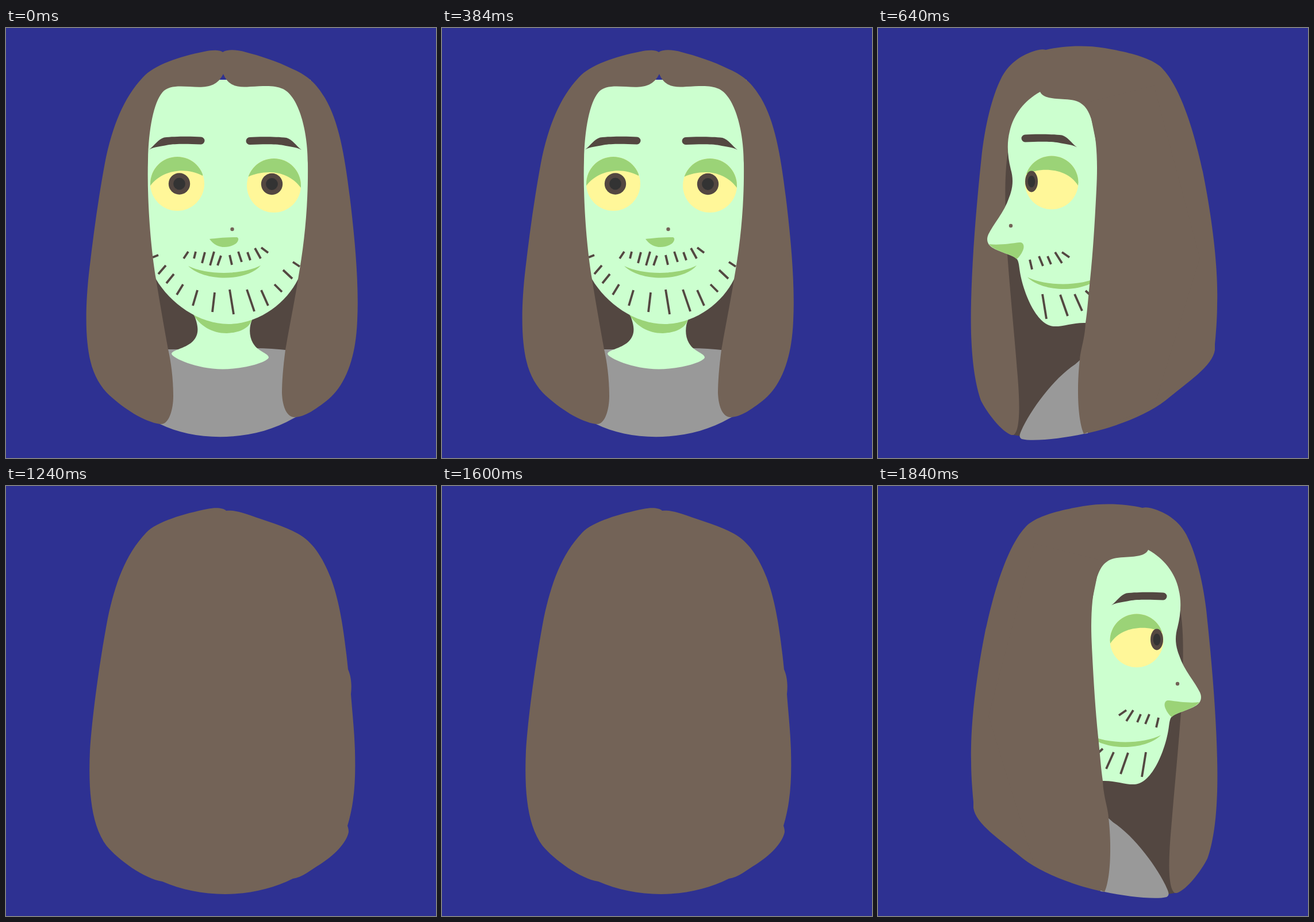
Recreate the animation shown at these times as an HTML page. Size 748 by 748 pixels, loop 2440 ms.

```html
<!DOCTYPE html>
<html lang="en">
<head>
<meta charset="utf-8">
<title>Turning head</title>
<style>
  html, body { margin: 0; width: 100%; height: 100%; overflow: hidden; background: #2e3192; }
  svg { display: block; width: 100vw; height: 100vh; }
  .pose { opacity: 0; }
  .hair { fill: #736357; }
  .dark { fill: #534741; }
  .skin { fill: #ccffcf; }
  .green { fill: #9bd377; }
  .shirt { fill: #999; }
  .eye { fill: #fff799; }
  .pupil { fill: #333; }
  .stubble { fill: none; stroke: #534741; stroke-width: 3.8; }
</style>
</head>
<body>
<svg viewBox="0 0 748 748">
  <defs>
    <path id="brow" class="dark" d="M514 212C505 205 498 194 488 191C470 189 440 189 424 190A6.5 6.5 0 0 0 424 203C450 202 470 202 482 204C495 207 505 207 514 212Z"/>
    <path id="mouth" class="green" d="M317 414C350 430 410 430 443 413C420 441 345 442 317 414Z"/>
    <clipPath id="eyeL"><circle cx="298" cy="271" r="47"/></clipPath>
    <clipPath id="eyeR"><circle cx="466" cy="274" r="47"/></clipPath>
    <clipPath id="eyeS"><circle cx="302" cy="269" r="46.5"/></clipPath>

    <g id="side">
      <path class="hair" d="M292 38C283 36 275 39 266 42C240 52 224 68 214 88C198 120 186 170 180 225C170 320 164 400 162 475C160 555 166 610 179 648C190 670 215 702 232 708L358 706C405 697 465 675 500 648C540 615 582 588 586 560C586 555 586 553 586 550C588 530 590 505 590 480C592 420 582 335 565 250C550 180 525 97 490 66C470 50 430 41 395 35C360 29 320 31 292 38Z"/>
      <path class="dark" d="M226 215C219 260 221 320 225 393C229 450 236 520 242 595C247 650 248 700 236 708L248 710L360 590L375 500L245 300Z"/>
      <path class="shirt" d="M365 705L358 706C320 714 270 720 250 715C245 712 246 708 249 701C265 665 305 610 343 585L360 570Z"/>
      <path class="skin" d="M282 111C287 122 305 123 325 124C350 125 362 132 371 158L390 250L375 513H361C340 512 322 520 305 519C275 516 253 460 247 425C245 412 245 402 238 399C228 393 203 387 195 379C189 373 189 366 192 359C200 342 220 320 228 295C236 275 235 260 231 246C225 222 224 200 229 180C236 150 254 127 282 111Z"/>
      <path class="green" d="M193 376C210 378 230 375 246 373C254 372 255 381 252 387C249 394 245 399 241 402C233 393 203 389 193 376Z"/>
      <circle class="hair" cx="231" cy="344" r="3.2"/>
      <use href="#brow" x="-168" y="-4.5"/>
      <g clip-path="url(#eyeS)">
        <circle class="eye" cx="302" cy="269" r="47"/>
        <path class="green" d="M250 258L258 254C285 241 330 244 348 274L360 215H250Z"/>
      </g>
      <ellipse class="dark" cx="267" cy="267" rx="11" ry="18.5"/>
      <ellipse class="pupil" cx="267" cy="267" rx="6.3" ry="10.3"/>
      <use href="#mouth" x="-57" y="19.5"/>
      <path class="stubble" d="M264 403L268 420M280 397L287 414M295 397L301 411M308 390L320 409M320 390L333 399M286 463L293 506M317 464L330 501M342 463L355 492M361 457L372 467"/>
      <path class="hair" d="M360 130C363 136 367 145 371 158C382 195 382 240 380 280C377 340 374 390 369 437C366 465 364 495 361 513C360 540 352 560 351 577C347 610 345 675 358 706L480 660L560 400L480 100Z"/>
    </g>
  </defs>

  <rect width="748" height="748" fill="#2e3192"/>

  <g class="pose">
    <path class="dark" d="M255 430H515L490 565H275Z"/>
    <path class="shirt" d="M268 559H312L380 570L434 557Q460 557 495 561L510 674L500 679C430 720 330 720 268 689L260 680Z"/>
    <path class="skin" d="M326 496C336 520 336 533 325 545C312 558 288 560 288 567C290 574 330 593 377 593.500C420 593 456 580 457 573C457 567 440 562 433 553C422 540 422 520 429 505Z"/>
    <path class="green" d="M325 497C337 518 358 531 384 531C405 530 424 523 428 506Z"/>
    <path class="skin" d="M240 90H530V390L508 437C488 478 440 515 387 515C335 515 285 478 261 437L240 400Z"/>
    <g clip-path="url(#eyeL)">
      <circle class="eye" cx="298" cy="271" r="48"/>
      <path class="green" d="M250 276C270 247 312 241 342 257L350 220H245Z"/>
    </g>
    <g clip-path="url(#eyeR)">
      <circle class="eye" cx="466" cy="274" r="48"/>
      <path class="green" d="M415 262L421 259C450 246 490 247 513 278L520 220H415Z"/>
    </g>
    <circle class="dark" cx="301.500" cy="271" r="18.700"/>
    <circle class="pupil" cx="301.500" cy="271" r="10.400"/>
    <circle class="dark" cx="462.500" cy="271.500" r="18.700"/>
    <circle class="pupil" cx="462.500" cy="271.500" r="10.400"/>
    <circle class="hair" cx="393.500" cy="350" r="3.200"/>
    <path class="green" d="M354 367C365 366 380 364 402 364C406 366 404 371 400 375C385 385 365 383 354 367Z"/>
    <use href="#mouth"/>
    <path class="stubble" d="M309 401L317 389M327 401L330 389M341 409L346 390M355 413L362 389M368 413L374 396M393 412L389 395M410 407L404 389M425 404L420 390M443 401L433 383M456 391L444 382"/>
    <path class="stubble" d="M255 399L265 395M265 428L278 413M279 444L292 428M297 464L308 446M325 483L333 456M359 494L363 460M396 498L389 455M432 493L419 455M456 483L444 456M480 459L467 446M498 436L482 421M511 415L499 407"/>
    <path class="hair" d="M377 42C372 38 358 38 345 41C300 50 258 64 238 86C205 121 185 170 172 235C160 300 152 360 145 420C138 480 137 540 147 580C153 605 165 625 180 639C205 662 240 685 268 689C283 691 291 665 291 640C291 610 287 580 282 559C275 520 267 475 261 437C252 385 245 300 247 230C248 175 257 130 272 112C282 100 300 101 320 102C345 104 366 104 378 80C387 102 405 104 425 102C450 101 466 99 482 106C510 120 525 180 525 235C526 310 519 375 508 437C503 470 493 520 486 560C482 590 480 615 480 635C481 660 489 677 502 677C520 677 540 662 557 649C588 625 608 580 611 510C614 450 608 380 600 310C590 225 580 165 555 122C540 97 525 83 500 72C470 57 440 48 417 42C400 37 384 37 377 42Z"/>
    <use href="#brow"/>
    <use href="#brow" transform="matrix(-1 0 0 1 763 -.5)"/>
  </g>

  <g class="pose"><use href="#side"/></g>

  <g class="pose">
    <path class="hair" d="M383 43C378 38 365 37 350 40C310 48 262 62 244 81C207 120 190 170 177 230C162 310 150 400 146 460C143 530 148 590 175 626C195 650 240 683 272 688C340 718 430 718 499 683C515 681 530 668 545 659C570 643 592 622 596 602C596 597 595 594 594 591C608 545 608 500 607 460C606 425 602 390 600 362C602 345 600 330 595 319C588 250 580 200 565 160C550 122 533 97 508 83C485 70 450 60 425 51C410 46 398 42 383 43Z"/>
  </g>

  <g class="pose"><use href="#side" transform="matrix(-1 0 0 1 752 0)"/></g>
</svg>
<script>
  const LOOP = 2440;
  const cuts = [0, 640, 1240, 1840, LOOP];

  document.querySelectorAll('.pose').forEach((pose, i) => {
    const from = cuts[i] / LOOP, to = cuts[i + 1] / LOOP;
    const steps = [{ offset: from, opacity: 1 }];
    if (from > 0) steps.unshift({ offset: 0, opacity: 0 });
    if (to < 1) steps.push({ offset: to, opacity: 0 }, { offset: 1, opacity: 0 });
    else steps.push({ offset: 1, opacity: 1 });
    steps.forEach(s => s.easing = 'step-end');
    pose.animate(steps, { duration: LOOP, iterations: Infinity }).startTime = 0;
  });
</script>
</body>
</html>
```
